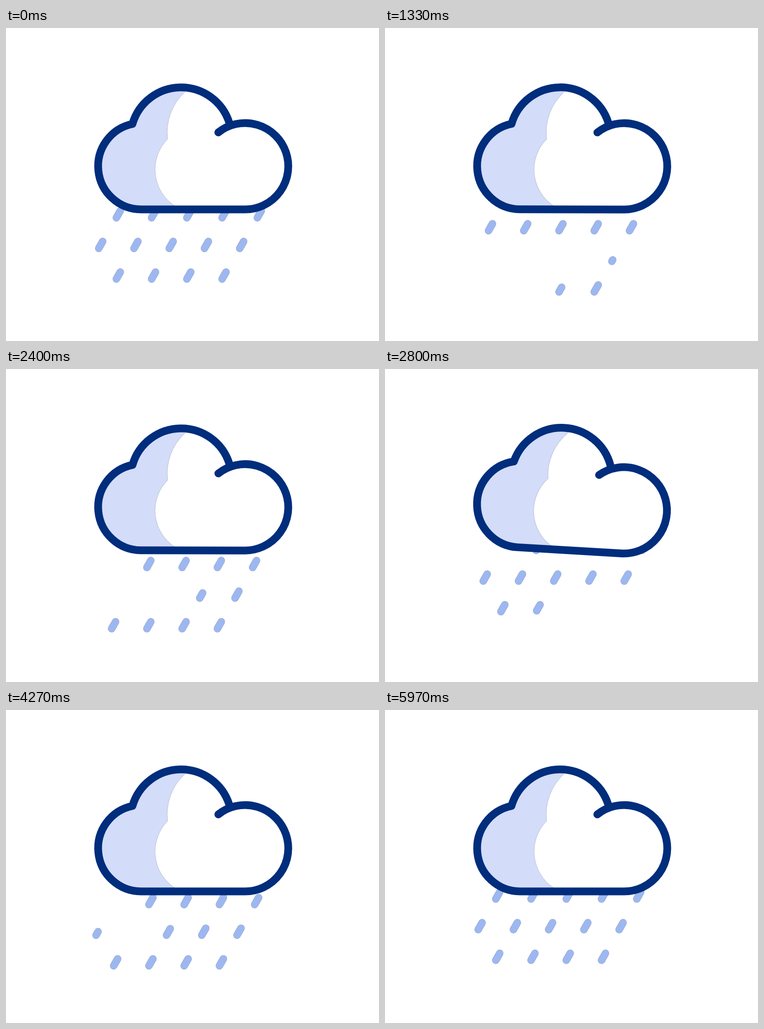
An HTML page with a canvas that plays this animation: 817x685 px, repeating every 6.01 s.

```html
<!DOCTYPE html>
<html lang="en">
<head>
<meta charset="utf-8">
<title>Rain cloud</title>
<style>
  html, body { margin: 0; width: 100%; height: 100%; overflow: hidden; background: #fff; }
  canvas { display: block; }
</style>
</head>
<body>
<canvas id="stage" width="817" height="685"></canvas>
<script>
const ctx = document.getElementById('stage').getContext('2d');
const { PI, sin, exp, floor, min, max } = Math;

const LOOP = 6010, CYCLE = 50, LAST_STEP = 149;
const NAVY = '#002d7c', SHADE = '#d3dcf8', DROP = '#9db7f0', EDGE = '#99a5c6', FOLD = '#b9c0d4';
const PIVOT = { x: 408.5, y: 295 };
const COLUMNS = 5, GAP = 77.2, ROW_STEP = 67, SLANT = 0.576;

// Two alternating rows of drops; times are in steps of 40 ms
const ROWS = [
  { x: 246, y: 407.7, born: -14, early: 2, blink: 17, regrow: 33.5, end: 58 },
  { x: 284.6, y: 340.7, born: 18, early: 17, blink: 49, regrow: 61.4, end: 76 }
];

const lobes = 'A94.5 94.5 0 0 1 277 210 A110.8 110.8 0 0 1 ';
const fold = 'M392 140 A120 120 0 0 0 354 243 A95 95 0 0 0 369 389';
const outline = new Path2D('M465 228.5 A94.5 94.5 0 1 1 522.5 397 H295.5 ' + lobes + '489 207');
const shade = new Path2D(fold + ' V397 H295.5 ' + lobes + '392 132 Z');
const foldLine = new Path2D(fold);

const clamp = v => min(1, max(0, v));

// Rain falls two rows per cycle, fastest halfway
const fallAt = age => {
  const u = age / CYCLE;
  return 2 * ROW_STEP * (u - 0.38 * sin(2 * PI * u) / (2 * PI));
};
const driftAt = phase => 1.8 * sin(PI * phase / CYCLE) ** 2;
const tiltAt = phase => 3.68 * exp(-(((phase - 21.7) / 6) ** 2));

function stroke(path, color, width) {
  ctx.strokeStyle = color;
  ctx.lineWidth = width;
  ctx.stroke(path);
}

// A drop retracts into its head, regrows from its tail, then retracts for good
function blinkTimes(row, i) {
  return i === 0
    ? [row.early, row.early + 11, row.blink + 5.5]
    : [row.blink + 3.4 * i, row.regrow + 3 * i, row.end + 2 * i];
}

function drawDrop(x, y, tail, head) {
  if (tail >= 1 || head <= 0) return;
  const point = k => [x + 4.3 - 8.6 * k, y - 7.6 + 15.2 * k];
  const path = new Path2D();
  path.moveTo(...point(tail));
  path.lineTo(...point(head));
  stroke(path, EDGE, 16.4);
  stroke(path, DROP, 15);
}

function drawRow(row, age, phase) {
  if (age < row.born) return;
  const fall = fallAt(age);
  for (let i = 0; i < COLUMNS; i++) {
    const [off, on, end] = blinkTimes(row, i);
    const back = age >= on;
    const tail = clamp((age - (back ? end : off)) / 3);
    const head = back ? clamp((age - on) / 3) : 1;
    drawDrop(row.x + GAP * i - SLANT * fall + driftAt(phase), row.y + fall, tail, head);
  }
}

function drawCloud(degrees) {
  ctx.save();
  ctx.translate(PIVOT.x, PIVOT.y);
  ctx.rotate(degrees * PI / 180);
  ctx.translate(-PIVOT.x, -PIVOT.y);
  ctx.fillStyle = '#fff';
  ctx.fill(outline);
  ctx.fillStyle = SHADE;
  ctx.fill(shade);
  stroke(foldLine, FOLD, 1);
  stroke(outline, NAVY, 17);
  ctx.restore();
}

function draw(time) {
  // 25 steps per second shown on a 30 Hz clock
  const tick = floor((time % LOOP + 4) * 0.03);
  const phase = min(LAST_STEP, floor(tick * 25 / 30)) % CYCLE;
  ctx.fillStyle = '#fff';
  ctx.fillRect(0, 0, 817, 685);
  ctx.lineCap = ctx.lineJoin = 'round';
  for (const row of ROWS)
    for (const shift of [-CYCLE, 0, CYCLE]) drawRow(row, phase + shift, phase);
  drawCloud(tiltAt(phase));
}

const start = performance.now();
function loop() {
  draw(performance.now() - start);
  requestAnimationFrame(loop);
}
loop();
</script>
</body>
</html>
```
